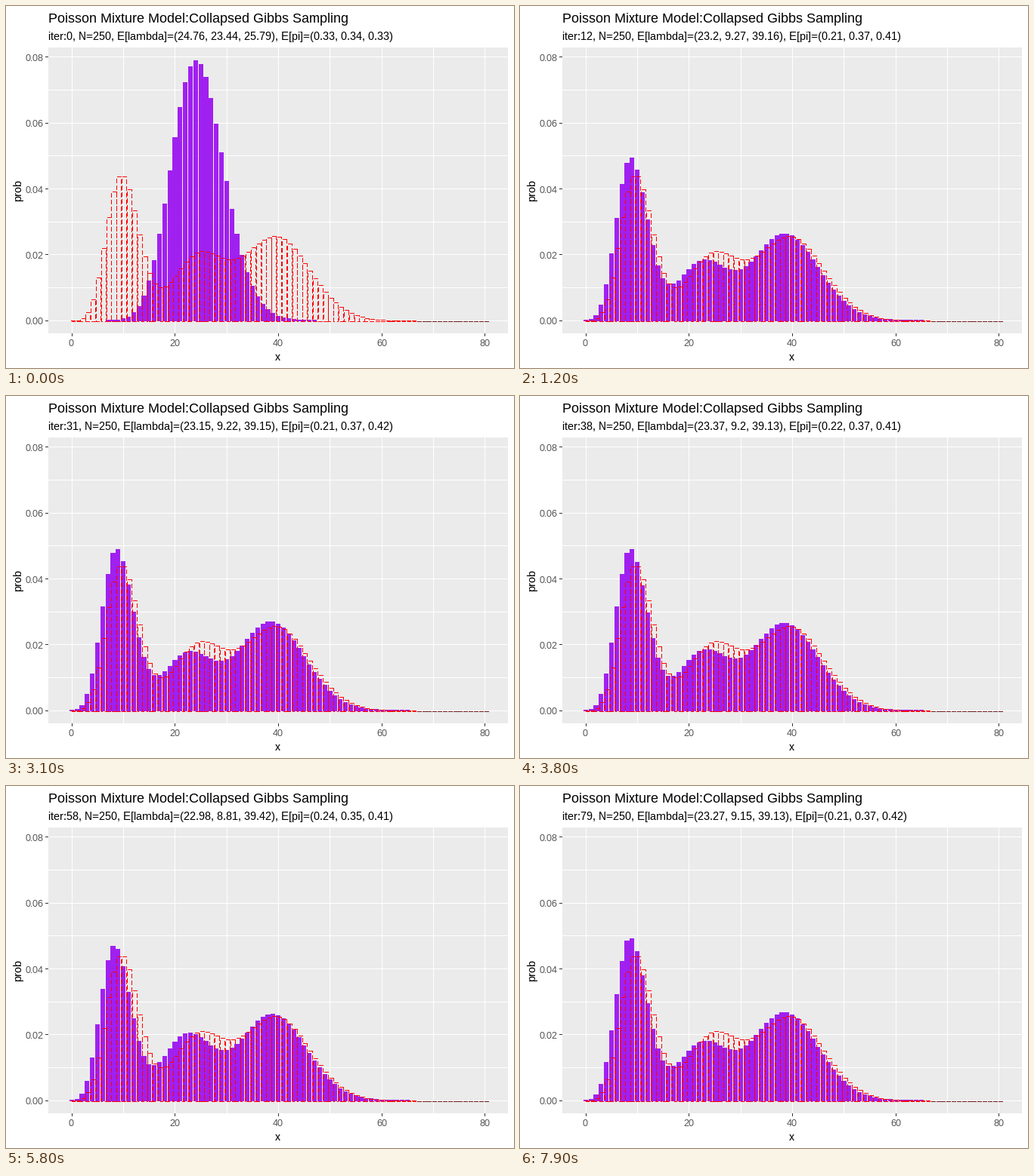
A matplotlib script that plays this animation: 672x480 px, repeating every 8000 ms.

```python
import numpy as np
import matplotlib.pyplot as plt
from matplotlib.animation import FuncAnimation
from matplotlib.collections import LineCollection, PolyCollection
from matplotlib.patches import Rectangle

plt.rcParams.update({
    "font.family": "Liberation Sans",
    "text.hinting": "native",
    "text.hinting_factor": 1,
    "text.kerning_factor": 6,
})

W, H, DPI = 672, 480, 96
FRAMES, STEP = 80, 100
PX = 72 / DPI                       # points per pixel

# Panel geometry in pixels, y pointing down
LEFT, TOP, RIGHT, BOTTOM = 56.6, 55.0, 664.67, 434.3
X_SCALE = (RIGHT - LEFT) / (80.9 * 1.1)
Y_SCALE = 4363.5
X_ZERO = LEFT + X_SCALE * (0.45 + 80.9 * 0.05)
Y_ZERO = 417.065
BASE = int(Y_ZERO)

K = np.arange(81)
LOG_FACT = np.concatenate([[0], np.cumsum(np.log(K[1:]))])

# Sampler state: three rates, then the first two weights
START = np.array([24.76, 23.44, 25.79, 0.33, 0.34])
SETTLED = np.array([23.2, 9.2, 39.1, 0.212, 0.37])
DRIFT = np.array([-0.15, -0.4, 0.5, 0.035, -0.02])
JITTER = np.array([0.12, 0.06, 0.08, 0.004, 0.003])


def sx(x):
    return X_ZERO + X_SCALE * x


def sy(y):
    return Y_ZERO - Y_SCALE * y


def tops(p):
    return np.floor(sy(p))


def mixture(lam, pi):
    lam, pi = np.reshape(lam, (-1, 1)), np.reshape(pi, (-1, 1))
    return (pi * np.exp(K * np.log(lam) - lam - LOG_FACT)).sum(axis=0)


def sample(i):
    """Damped burn-in, one slow drift and a little seeded noise."""
    burn_in = np.exp(-i / 2) * np.cos(i / 2.5)
    drift = np.exp(-((i - 57) / 9) ** 2)
    noise = np.random.default_rng(i).normal(0, JITTER) * (1 - np.exp(-i))
    state = SETTLED + (START - SETTLED) * burn_in + DRIFT * drift + noise
    lam, pi = state[:3], state[3:]
    return lam, np.append(pi, 1 - pi.sum())


fig = plt.figure(figsize=(W / DPI, H / DPI), dpi=DPI, facecolor="white")
ax = fig.add_axes([0, 0, 1, 1])
ax.set(xlim=(0, W), ylim=(H, 0))
ax.axis("off")


def box(x0, y0, x1, y1, color):
    ax.add_patch(Rectangle((x0, y0), x1 - x0, y1 - y0, fc=color, lw=0,
                           antialiased=False, zorder=1))


def label(x, y, s, size, color="black", **kw):
    return ax.text(x, y, s, fontsize=size * PX, color=color, ha="left",
                   va="baseline", rotation_mode="anchor", **kw)


# Panel, grid, ticks and tick labels
px0, py0, px1, py1 = (int(v) for v in (LEFT, TOP, RIGHT, BOTTOM))
box(px0, py0, px1, py1, "#EBEBEB")
for v in range(0, 81, 10):
    x = int(sx(v))
    box(x, py0, x + 1, py1, "white")
for v in range(9):
    y = int(sy(v / 100))
    box(px0, y, px1, y + 1, "white")
for v in range(0, 81, 20):
    x = int(sx(v))
    box(x, py1, x + 1, py1 + 4, "#333333")
    label(int(sx(v) - 3.5 * len(str(v))), 451, str(v), 12, "#4D4D4D")
for v in range(0, 9, 2):
    y = sy(v / 100)
    box(52, int(y), px0, int(y) + 1, "#333333")
    label(26, int(y + 4.5) + 1, f"{v / 100:.2f}", 12, "#4D4D4D")

label(56, 22, "Poisson Mixture Model:Collapsed Gibbs Sampling", 18)
subtitle = label(56, 45, "", 15)
label(356, 470, "x", 15)
label(20, 259, "prob", 15, rotation=90)

# Estimated density
bar_l, bar_r = np.floor(sx(K - 0.45)), np.floor(sx(K + 0.45))
bars = PolyCollection([], facecolors="#A020F0", linewidths=0,
                      antialiaseds=False, zorder=2)
ax.add_collection(bars, autolim=False)

# True density as dashed outlines
true_tops = tops(mixture((10, 25, 40), (0.35, 0.25, 0.4)))
outlines = [
    [(r, t), (l, t), (l, BASE + 0.5), (r, BASE + 0.5), (r, t)]
    for l, r, t in zip(bar_l + 0.5, bar_r + 0.5, true_tops + 0.5)
]
colors = ["red" if t < BASE else "#6B1A1A" for t in true_tops]
ax.add_collection(
    LineCollection(outlines, colors=colors, linewidths=PX,
                   linestyles=[(0, (5, 3))], antialiaseds=False, zorder=3),
    autolim=False)


def fmt(values):
    return "(" + ", ".join(f"{round(v, 2):g}" for v in values) + ")"


def draw(i):
    lam, pi = sample(i)
    bars.set_verts([
        [(l, BASE + 1), (l, t), (r, t), (r, BASE + 1)]
        for l, r, t in zip(bar_l, bar_r, tops(mixture(lam, pi))) if t < BASE
    ])
    subtitle.set_text(f"iter:{i}, N=250, E[lambda]={fmt(lam)}, E[pi]={fmt(pi)}")
    return bars, subtitle


anim = FuncAnimation(fig, draw, frames=FRAMES, interval=STEP,
                     repeat=True, repeat_delay=0, blit=False)
plt.show()
```
